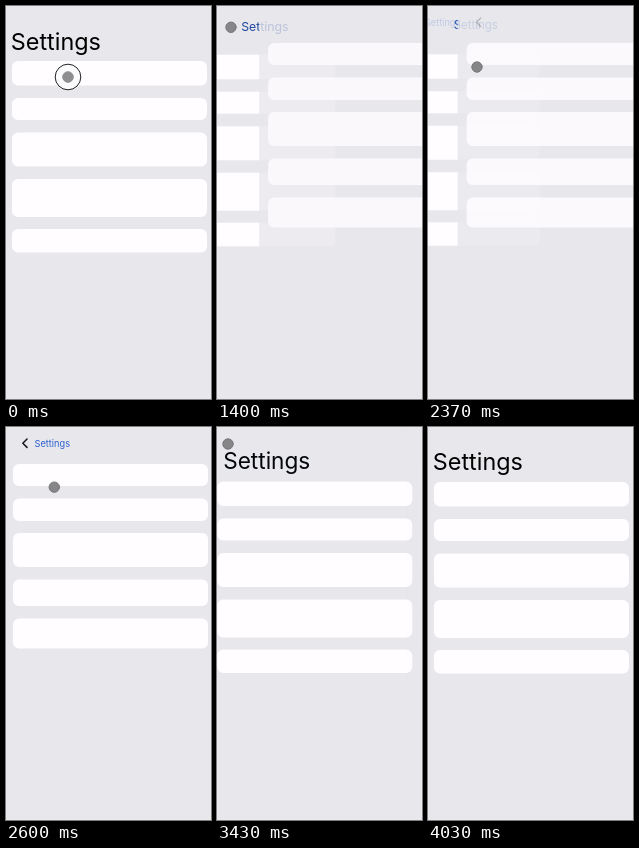
These frames come from a looping animation (205 px wide and 393 px high, 4630 ms). An HTML page with a canvas:

```html
<!DOCTYPE html>
<html lang="en">
<head>
<meta charset="utf-8">
<title>Settings navigation</title>
<style>
  html, body { margin: 0; width: 100%; height: 100%; overflow: hidden; background: #e8e7ec; }
  canvas { display: block; width: 205px; height: 393px; }
</style>
</head>
<body>
<canvas id="stage"></canvas>
<script>
const W = 205, H = 393, LOOP = 4630;
const BACKGROUND = '#e8e7ec', CARD = '#fffdff';
const BLUE = [38, 92, 205], BLACK = [0, 0, 0];

// Cards as [top, height]
const HOME_CARDS = [[55, 24.5], [92, 22], [126.5, 34], [173, 38], [223, 23.5]];
const DETAIL_CARDS = [[37, 22], [71.5, 22.5], [106, 34], [152.5, 26.5], [191.5, 30]];

// Navigation springs: [start, target, stiffness per second]
const SPRINGS = [[58, 1, 18], [1361, 0, 22], [2188, 1, 18], [3220, 0, 22]];

// Touch positions: [time, x, y, easing into this point]
const linear = u => u;
const easeOut = u => 1 - (1 - u) ** 2;
const easeInOut = u => u * u * (3 - 2 * u);
const TOUCH = [
  [0, 62, 71, linear], [590, 62, 71, linear], [730, 38, 50.5, linear], [1100, 14, 21, easeOut],
  [1690, 14, 21.5, linear], [2070, 49, 61, easeInOut], [2560, 49, 61, linear],
  [3060, 11, 17, easeInOut], [4030, 11, 17, linear]
];
const TOUCH_END = 4030;
const PRESSES = [[0, 70], [1210, 1365], [2060, 2200], [3090, 3225]];

const canvas = document.getElementById('stage');
const ctx = canvas.getContext('2d');
const ratio = window.devicePixelRatio || 1;
canvas.width = W * ratio;
canvas.height = H * ratio;

const mix = (a, b, u) => a + (b - a) * u;
const clamp = u => Math.min(1, Math.max(0, u));

// 0 = home page, 1 = detail page
function navigation(t) {
  const spring = SPRINGS.filter(([start]) => start <= t).pop();
  if (!spring) return 0;
  const [start, target, stiffness] = spring;
  const x = stiffness * (t - start) / 1000;
  const rest = (1 + x) * Math.exp(-x);
  return target ? 1 - rest : rest;
}

function touchAt(t) {
  const i = TOUCH.findIndex(point => point[0] > t);
  const [t0, x0, y0] = TOUCH[i - 1];
  const [t1, x1, y1, ease] = TOUCH[i];
  const u = ease((t - t0) / (t1 - t0));
  return [mix(x0, x1, u), mix(y0, y1, u)];
}

function drawCards(cards, dx, dy) {
  ctx.fillStyle = CARD;
  ctx.beginPath();
  for (const [top, height] of cards) ctx.roundRect(6 + dx, top + dy, 195, height, 6);
  ctx.fill();
}

function drawTitle(q, dx = 0) {
  const color = BLACK.map((c, i) => Math.round(mix(c, BLUE[i], q)));
  ctx.fillStyle = `rgb(${color})`;
  ctx.font = `400 ${mix(23.4, 9.2, q)}px Inter, sans-serif`;
  ctx.fillText('Settings', mix(4.8, 29.6, q) + dx, mix(43.5, 19.6, q));
}

function drawChevron(dx) {
  ctx.strokeStyle = '#111';
  ctx.lineWidth = 1.5;
  ctx.lineCap = ctx.lineJoin = 'round';
  ctx.beginPath();
  ctx.moveTo(20 + dx, 12);
  ctx.lineTo(15.8 + dx, 16.2);
  ctx.lineTo(20 + dx, 20.4);
  ctx.stroke();
}

function drawDetail(q) {
  const dx = W * (1 - q);
  ctx.globalAlpha = q;
  ctx.fillStyle = BACKGROUND;
  ctx.fillRect(dx - 3, 0, W + 3, H);
  drawCards(DETAIL_CARDS, dx, 0);
  ctx.globalAlpha = clamp((q - 0.8) * 5);
  drawChevron(dx);
  drawTitle(1, -dx);
  ctx.globalAlpha = 1;
}

function drawDisc(x, y, radius, fill, stroke) {
  ctx.beginPath();
  ctx.arc(x, y, radius, 0, 2 * Math.PI);
  ctx.fillStyle = fill;
  ctx.fill();
  ctx.strokeStyle = stroke;
  ctx.lineWidth = 1;
  ctx.stroke();
}

function drawTouch(t) {
  if (t >= TOUCH_END) return;
  const [x, y] = touchAt(t);
  const pressed = PRESSES.some(([from, to]) => t >= from && t < to);
  if (pressed) {
    drawDisc(x, y, 12.8, '#fbfafc', '#222');
    drawDisc(x, y, 5.3, '#8e8d90', '#8e8d90');
  } else {
    drawDisc(x, y, 5.2, '#868588', '#77767a');
  }
}

function render(t) {
  const q = navigation(t);
  ctx.setTransform(ratio, 0, 0, ratio, 0, 0);
  ctx.fillStyle = BACKGROUND;
  ctx.fillRect(0, 0, W, H);
  drawCards(HOME_CARDS, -106 * q, -8 * q);
  drawTitle(q);
  if (q > 0.001) drawDetail(q);
  drawTouch(t);
}

const began = performance.now();
function tick() {
  render((performance.now() - began) % LOOP);
  requestAnimationFrame(tick);
}
tick();
</script>
</body>
</html>
```
